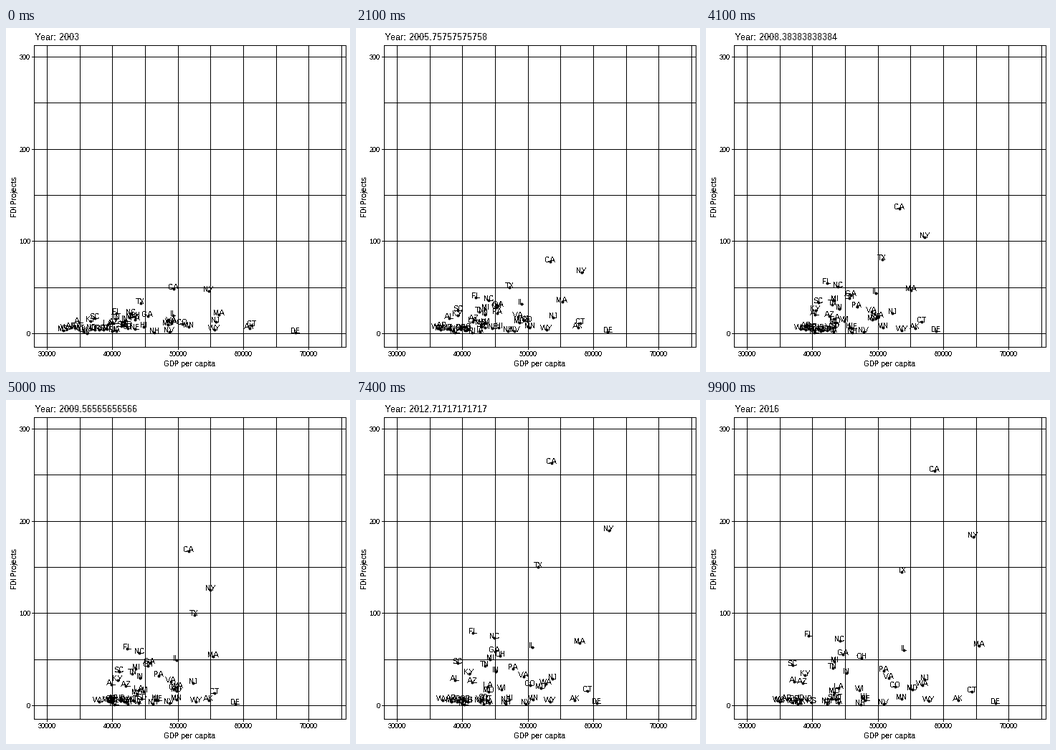
Write a matplotlib script that moves like this. It is 480 px wide and 480 px high and loops after 10000 ms.

```python
import numpy as np
import matplotlib.pyplot as plt
from matplotlib.animation import FuncAnimation

plt.rcParams.update({
    "font.family": "Liberation Sans",
    "text.antialiased": False,
    "text.hinting": "native",
    "text.hinting_factor": 1,
})

SIZE, FRAMES = 480, 100
LEFT, RIGHT, TOP, BOTTOM = 39, 474, 24, 445
YEARS = np.arange(2003, 2017)
SPAN = (YEARS - YEARS[0]) / (YEARS[-1] - YEARS[0])
rng = np.random.default_rng(4)

# GDP per capita in thousands at a few years, then first and peak projects
LEADER_YEARS = [2003, 2007, 2010, 2013, 2016]
LEADERS = {
    "CA": ([49.4, 55.2, 51.1, 53.9, 58.7], 48, 270),
    "NY": ([54.7, 59.8, 54.2, 63.3, 64.6], 46, 194),
    "TX": ([44.3, 48.5, 53.2, 51.4, 53.7], 33, 154),
}

# First and last GDP in thousands, sorted by peak projects
MIDDLE = {
    "FL": (40.6, 39.4), "NC": (42.8, 44.2), "MA": (56.3, 65.5),
    "IL": (49.3, 54.0), "GA": (45.4, 44.7), "OH": (43.5, 47.5),
    "MI": (42.6, 43.4), "SC": (37.3, 37.0), "TN": (40.5, 43.1),
    "PA": (43.5, 50.9), "IN": (41.9, 45.2), "KY": (36.7, 38.9),
    "VA": (49.1, 51.7), "NJ": (55.8, 57.2), "AL": (34.9, 37.2),
    "AZ": (40.2, 38.5), "WA": (49.1, 56.8), "CO": (50.7, 52.7),
    "LA": (39.3, 44.0), "MD": (48.5, 55.3), "WI": (41.8, 47.2),
    "CT": (61.3, 64.4), "MO": (42.2, 43.4),
}

# States near the axis, from lowest to highest GDP
CROWD = ("MS WV AR ID MT OK ME ND OR KS NM VT "
         "RI IA SD UT NE HI NH NV MN WY AK DE").split()


def gdp_x(v):
    return 57 + (v - 30) * 9.13


def fdi_y(v):
    return 426 - v * 1.2867


def growth(first, peak, power):
    """Rise to a peak around 2013, then a slow decline."""
    rise = np.clip((YEARS - 2003) / 9.7, 0, 1) ** power
    fade = 1 - 0.02 * np.clip(YEARS - 2013, 0, None)
    return (first + (peak - first) * rise) * fade


def drift(first, last, wobble):
    """Trend that is pulled towards the mean between its two ends."""
    trend = first + (last - first) * SPAN
    bell = np.sin(np.pi * SPAN)
    noise = wobble * rng.standard_normal(len(YEARS))
    return trend + bell * (0.4 * (46 - trend) + noise)


def build_states():
    states = {}
    for name, (gdp, first, peak) in LEADERS.items():
        states[name] = np.interp(YEARS, LEADER_YEARS, gdp), growth(first, peak, 1.6)
    for rank, (name, ends) in enumerate(MIDDLE.items()):
        first, peak = 22 * np.exp(-rank / 22), 80 * np.exp(-rank / 13)
        states[name] = drift(*ends, 0.6), growth(first, peak, 1)
    for u, name in zip(np.linspace(0, 1, len(CROWD)), CROWD):
        first = 32.5 + 14 * u + 21.5 * u ** 8
        last = first + rng.normal(3.5, 1.5) * (1 - u ** 8)
        level = rng.uniform(1, 7) + rng.uniform(-1, 1, len(YEARS))
        states[name] = drift(first, last, 0.8), level
    return states


fig = plt.figure(figsize=(SIZE / 72, SIZE / 72), dpi=72, facecolor="white")
ax = fig.add_axes([0, 0, 1, 1])
ax.set_xlim(0, SIZE)
ax.set_ylim(SIZE, 0)
ax.axis("off")


def line(x0, y0, x1, y1):
    ax.plot([x0, x1], [y0, y1], color="black", lw=1, aa=False,
            solid_capstyle="projecting", zorder=1)


def text(x, y, s, size, **kw):
    return ax.text(x, y, s, fontsize=size, color="black", **kw)


def draw_chart():
    for v in range(30, 76, 5):
        x = round(gdp_x(v))
        major = v % 10 == 0
        line(x, TOP, x, BOTTOM + 3 * major)
        if major:
            text(x, 458, f"{v}000", 9, ha="center")
    for v in range(0, 301, 50):
        y = round(fdi_y(v))
        major = v % 100 == 0
        line(LEFT - 3 * major, y, RIGHT, y)
        if major:
            text(34, y + 4, str(v), 9, ha="right")
    for x in (LEFT, RIGHT):
        line(x, TOP, x, BOTTOM)
    for y in (TOP, BOTTOM):
        line(LEFT, y, RIGHT, y)
    text(256, 472, "GDP per capita", 11, ha="center")
    text(17, 235, "FDI Projects", 11, rotation=90, ha="right", va="center")


draw_chart()
states = build_states()
title = text(40, 17, "", 13)
dots, = ax.plot([], [], "o", color="black", ms=4, mew=0, aa=False, zorder=3)
labels = [text(0, 0, name, 11, ha="center", zorder=4) for name in states]


def update(i):
    year = 2003 + 13 * i / (FRAMES - 1)
    title.set_text(f"Year: {year:.15g}")
    xs = [gdp_x(np.interp(year, YEARS, gdp)) for gdp, _ in states.values()]
    ys = [fdi_y(np.interp(year, YEARS, fdi)) for _, fdi in states.values()]
    dots.set_data(xs, ys)
    for label, x, y in zip(labels, xs, ys):
        label.set_position((x, y + 1))
    return [title, dots, *labels]


anim = FuncAnimation(fig, update, frames=FRAMES, interval=100,
                     repeat=True, repeat_delay=0, blit=False)
plt.show()
```
